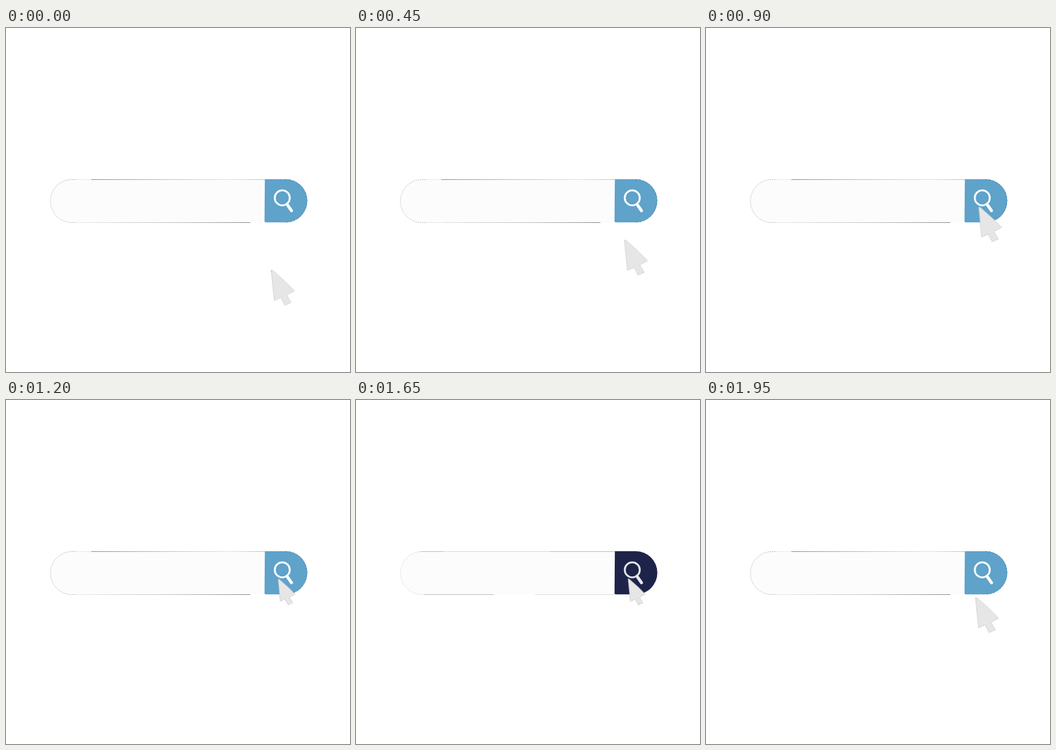
An HTML page that plays this animation: 480x480 px, repeating every 2.1 s.

```html
<!DOCTYPE html>
<html lang="en">
<head>
<meta charset="utf-8">
<title>Search bar click</title>
<style>
  html, body { margin: 0; width: 100%; height: 100%; overflow: hidden; background: #fff; }
  svg { display: block; width: 100%; height: 100%; }
  .button, .lens, .idle, .pressed, .cursor { animation: 2100ms step-end infinite; }
  .button { animation-name: button; }
  .lens { animation-name: lens; fill: none; stroke-linecap: round; }
  .idle { animation-name: idle; }
  .pressed { animation-name: pressed; }
  .cursor { animation-name: move; transform-origin: 0 0; }
  .cursor path { fill: #e6e6e6; stroke: #a2a2a2; stroke-width: .6; stroke-dasharray: 2 1.5; vector-effect: non-scaling-stroke; }
  .edge { fill: none; stroke-width: 1; }

  @keyframes button { 0%, 85.71% { fill: #5fa2ca; } 64.28% { fill: #1e2449; } }
  @keyframes lens { 0%, 85.71% { stroke: #fbfdfe; } 64.28% { stroke: #e6e7ec; } }
  @keyframes idle { 0%, 85.71% { opacity: 1; } 64.28% { opacity: 0; } }
  @keyframes pressed { 0%, 85.71% { opacity: 0; } 64.28% { opacity: 1; } }

  /* fourteen held poses: approach, shrink, vanish, grow back */
  @keyframes move {
    0% { transform: translate(370px, 338.5px); }
    7.14% { transform: translate(367.5px, 323.5px); }
    14.28% { transform: translate(366.5px, 308.5px); }
    21.42% { transform: translate(374.5px, 296.5px); }
    28.57%, 92.85% { transform: translate(376px, 276.3px); }
    35.71% { transform: translate(376px, 262px); }
    42.85% { transform: translate(380.2px, 250px); }
    50%, 85.71% { transform: translate(379.7px, 250px) scale(.87); }
    57.14% { transform: translate(379.5px, 250px) scale(.74); }
    64.28% { transform: translate(379.5px, 250px) scale(0); }
    71.42% { transform: translate(379.5px, 249.7px) scale(.61); }
    78.57% { transform: translate(379.5px, 249.7px) scale(.75); }
  }
</style>
</head>
<body>
<svg viewBox="0 0 480 480">
  <defs>
    <linearGradient id="top" gradientUnits="userSpaceOnUse" x1="119" x2="361">
      <stop offset="0" stop-color="#9c9c9c"/>
      <stop offset=".45" stop-color="#c8cbcc"/>
      <stop offset=".8" stop-color="#e6e6e6"/>
      <stop offset="1" stop-color="#c2cacf"/>
    </linearGradient>
    <linearGradient id="bottom" gradientUnits="userSpaceOnUse" x1="122" x2="341">
      <stop offset="0" stop-color="#e4e4e4"/>
      <stop offset=".5" stop-color="#c8cbcd"/>
      <stop offset="1" stop-color="#959b9f"/>
    </linearGradient>
  </defs>

  <path fill="#fcfcfc" d="M361 211H92a30.2 30.2 0 0 0 0 60.4H361Z"/>
  <g class="edge idle">
    <path stroke="#c9c9c9" stroke-dasharray="2 1" d="M97 211.5H92a30 30 0 0 0 0 60H97"/>
    <path stroke="#ebebeb" d="M97 211.5H119M97 271.5H122"/>
    <path stroke="url(#top)" d="M119 211.5H361"/>
    <path stroke="url(#bottom)" d="M122 271.5H341"/>
  </g>
  <g class="edge pressed">
    <path stroke="#d3d3d3" stroke-dasharray="1.5 1.5" d="M97 211.5H92a30 30 0 0 0 0 60H97"/>
    <path stroke="#c6c6c6" d="M90 211.5H122M95 271.5H192M270 211.5H361"/>
    <path stroke="#dedede" d="M122 211.5H270M250 271.5H361"/>
  </g>

  <path class="button" d="M361.2 211H390.4a30.1 30.1 0 0 1 0 60.2H362.4Q360.7 271.2 360.7 269.6Z"/>
  <path class="edge idle" stroke="#4886ab" stroke-dasharray="2 3" d="M390 211.4a29.8 29.8 0 0 1 0 59.6"/>
  <g class="lens">
    <circle cx="385.5" cy="237" r="10.5" stroke-width="2.6"/>
    <path stroke-width="4.2" d="M392.8 247L398.4 255"/>
  </g>

  <g class="cursor">
    <path d="M0 -.4L2.5 .1L19 14.7L32.4 28.2L21.5 34L27.8 44.6L19 48.2L13.5 37.5L4.3 41.8Z"/>
  </g>
</svg>
</body>
</html>
```
